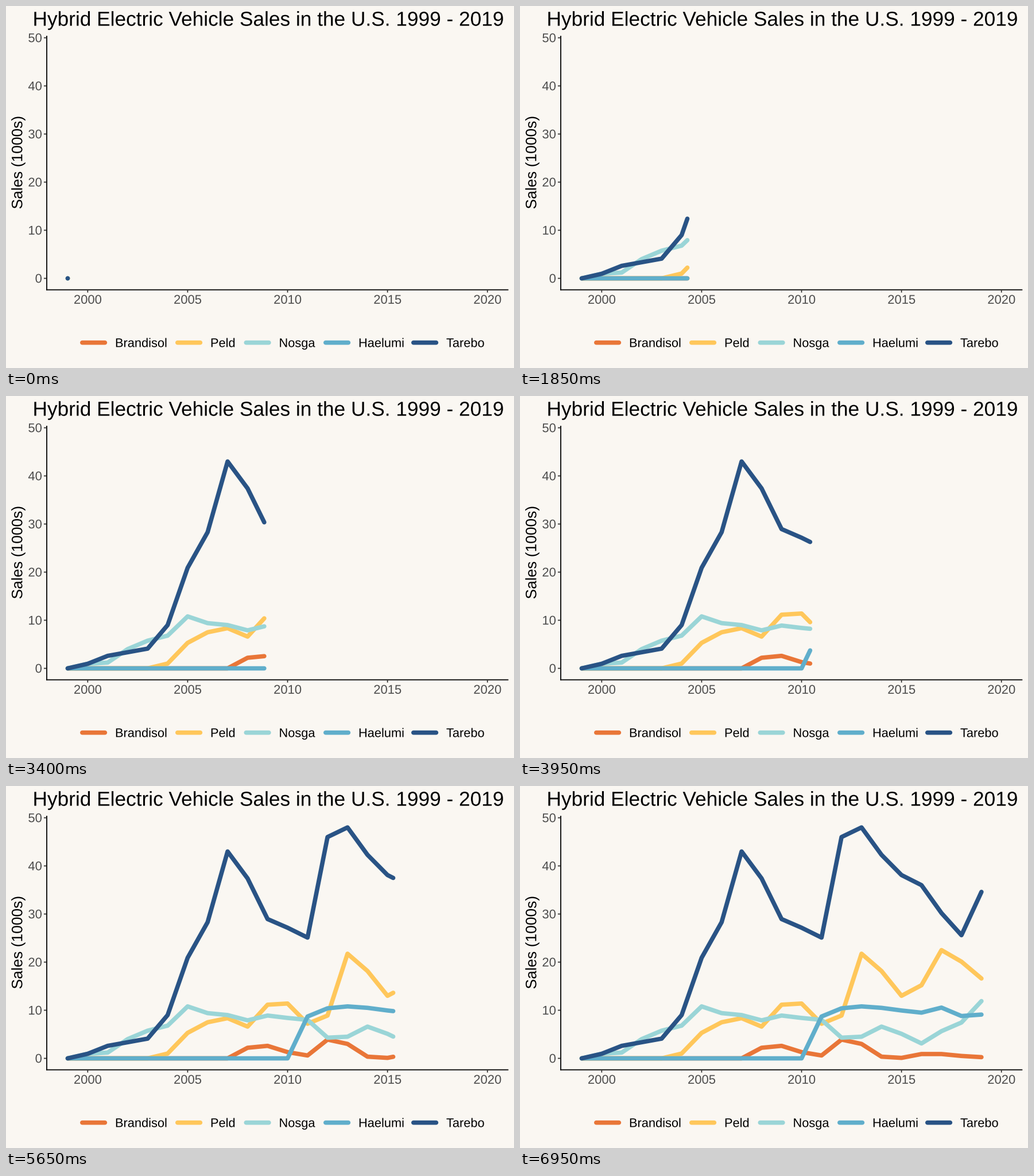
A matplotlib script that plays this animation: 885 px wide and 632 px high, repeating every 10 s.

```python
import matplotlib.pyplot as plt
import numpy as np
from matplotlib.animation import FuncAnimation
from matplotlib.patches import PathPatch
from matplotlib.textpath import TextPath
from matplotlib.transforms import Affine2D

W, H, DPI = 885, 632, 100
PX = 72 / DPI
FRAMES, STEP_MS = 200, 50
FIRST, YEARS = 1999, 21
LINE = 7.6

# name, colour, legend key x, sales from the first non-zero year to 2019
SERIES = [
    ("Brandisol", "#E97638", 129,
     [2.2, 2.6, 1.3, .6, 3.9, 3, .35, .1, .9, .9, .5, .25]),
    ("Peld", "#FFC75B", 295,
     [1, 5.3, 7.5, 8.35, 6.6, 11.15, 11.4, 7.2, 8.9, 21.75, 18.15, 13, 15.2,
      22.5, 20.1, 16.6]),
    ("Nosga", "#9AD5D7", 414.5,
     [.95, 1.2, 4, 5.75, 6.8, 10.8, 9.4, 9, 7.9, 8.9, 8.4, 8, 4.3, 4.5, 6.6,
      5.1, 3.1, 5.65, 7.45, 11.9]),
    ("Haelumi", "#60AECB", 553,
     [8.7, 10.4, 10.8, 10.5, 9.95, 9.5, 10.55, 8.8, 9.1]),
    ("Tarebo", "#295385", 706,
     [.95, 2.6, 3.35, 4.1, 9, 20.9, 28.3, 43, 37.4, 28.95, 27.15, 25.1, 46,
      48, 42.3, 38.1, 36, 30.2, 25.6, 34.6]),
]

fig = plt.figure(figsize=(W / DPI, H / DPI), dpi=DPI, facecolor="#FAF7F2")
ax = fig.add_axes([0, 0, 1, 1])
ax.set_xlim(0, W)
ax.set_ylim(H, 0)
ax.axis("off")


def year_x(t):
    """Pixel x of t years after the first year."""
    return 107.5 + 34.82 * np.asarray(t)


def sales_y(v):
    return 475.5 - 8.4 * np.asarray(v)


def stroke(x, y, color, width, cap="butt", z=2):
    return ax.plot(x, y, color=color, lw=width * PX, solid_capstyle=cap,
                   solid_joinstyle="round", snap=False, zorder=z)[0]


def label(text, x, y, size, color="black", align="left", angle=0):
    """Text outline on baseline y; left starts at the pen, others use the ink."""
    path = TextPath((0, 0), text, size=size, prop={"family": "Liberation Sans"})
    box = path.get_extents()
    shift = {"left": 0, "center": -(box.x0 + box.x1) / 2, "right": -box.x1}[align]
    place = Affine2D().translate(shift, 0).scale(1, -1).rotate_deg(-angle)
    path = path.transformed(place.translate(x, y))
    ax.add_patch(PathPatch(path, fc=color, lw=0, snap=False))


label("Hybrid Electric Vehicle Sales in the U.S. 1999 - 2019",
      457.6, 34.5, 35.25, align="center")
label("Sales (1000s)", 28.3, 273.5, 26.4, align="center", angle=90)

stroke([71, 71], [52, 496.3], "black", 1.8)
stroke([70.1, 875.3], [495.5, 495.5], "black", 1.8)
for v in range(0, 51, 10):
    y = sales_y(v)
    stroke([66, 70.2], [y, y], "#333333", 1.8)
    label(str(v), 62, y + 7.6, 22, "#4D4D4D", "right")
for year in range(2000, 2021, 5):
    x = year_x(year - FIRST)
    stroke([x, x], [496.3, 500.3], "#333333", 1.8)
    label(str(year), x + .2, 519.8, 22, "#4D4D4D", "center")

values, lines = [], []
for i, (name, color, key, sales) in enumerate(SERIES):
    stroke([key + 3.8, key + 43.4], [587.7, 587.7], color, LINE, "round")
    label(name, key + 61, 595.4, 21.8)
    values.append([0] * (YEARS - len(sales)) + sales)
    lines.append(stroke([], [], color, LINE, "round", 3 + i))

years = np.arange(YEARS)
# Seven frames a year, with one shorter step into the tenth year.
stops = 7 * years - (years > 9)


def update(frame):
    now = np.interp(frame, stops, years)
    past = years[years < now]
    t = np.append(past, now) if len(past) else np.array([0, .001])
    for line, v in zip(lines, values):
        line.set_data(year_x(t), sales_y(np.interp(t, years, v)))
    return lines


anim = FuncAnimation(fig, update, frames=FRAMES, interval=STEP_MS,
                     init_func=lambda: update(0), repeat=True, repeat_delay=0)
plt.show()
```
